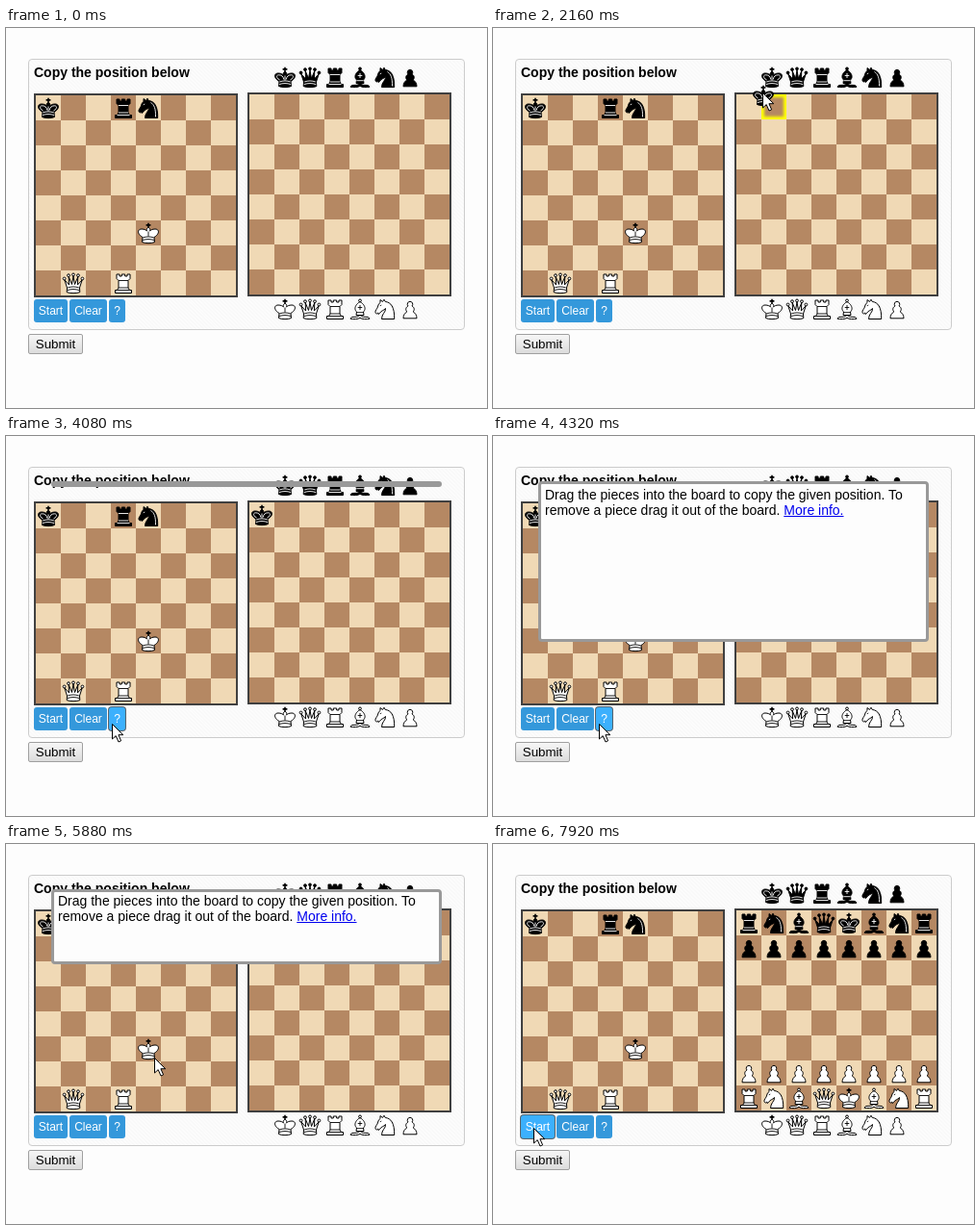
Recreate the animation shown at these times as an HTML page. Size 500x395 px, loop 8000 ms.

```html
<!DOCTYPE html>
<html lang="en">
<head>
<meta charset="utf-8">
<title>Copy the position</title>
<style>
html, body { margin: 0; width: 100%; height: 100%; overflow: hidden; background: #fdfdfd; }
body { position: relative; font: 14px/16px "Liberation Sans", Arial, sans-serif; color: #000; }
body > * { position: absolute; box-sizing: border-box; }
svg { left: 0; top: 0; width: 500px; height: 395px; }
#panel {
  left: 23px; top: 32px; width: 454px; height: 282px;
  border: 1px solid #ccc; border-radius: 4px;
  background: repeating-linear-gradient(45deg, #fcfcfc 0 1.4px, #f9f9f9 1.4px 2.8px);
}
#title { left: 29px; top: 38px; font-weight: bold; white-space: nowrap; }
.btn {
  top: 282px; height: 24px; border-radius: 3px; background: #3498db;
  color: #fff; font-size: 12px; line-height: 24px; text-align: center;
}
.btn.hover { background: #3cb0fd; }
.btn.focus { box-shadow: 0 0 0 1px #56626b; }
#submit {
  left: 23px; top: 318px; width: 57px; height: 21px;
  border: 1px solid #a0a0a0; border-radius: 2px;
  background: linear-gradient(#f6f6f6, #dcdcdc);
  font-size: 13.333px; line-height: 19px; text-align: center;
}
#info {
  left: 47px; top: 47px; width: 406px; overflow: hidden;
  border: 3px solid #999; border-radius: 4px; background: #fdfdfd;
}
#info p { margin: 0 4px; width: 392px; }
#info a { color: #00e; text-decoration: underline; }
.w { --fill: #fff; --line: #000; --inner: none; }
.b { --fill: #000; --line: #fff; --inner: #fff; }
.body { fill: var(--fill); stroke: #000; stroke-linejoin: round; }
.bar { fill: none; stroke: #000; stroke-width: 1.6; }
.line { fill: none; stroke: var(--line); stroke-width: .9; }
.inner { fill: none; stroke: var(--inner); stroke-width: .9; }
.mark { box-shadow: inset 0 0 3px 3px yellow; top: 69px; width: 26px; height: 26px; }
</style>
</head>
<body>
<div id="panel"></div>
<div id="title">Copy the position below</div>
<div class="btn" style="left:29px;width:35px">Start</div>
<div class="btn" style="left:66px;width:39px">Clear</div>
<div class="btn" style="left:107px;width:17px">?</div>
<div id="submit">Submit</div>
<svg id="boards"><defs id="defs"></defs></svg>
<div class="mark" id="mark"></div>
<svg id="moving"></svg>
<div id="info"><p>Drag the pieces into the board to copy the given position. To remove a piece drag it out of the board. <a>More info.</a></p></div>
<svg><path id="cursor" d="M.5 .5V16L4.2 12.6L7 19L9.6 17.8L6.9 11.7H11.8Z" fill="#fff" stroke="#000"/></svg>

<script>
const LOOP = 8000, STEP = 120, CELL = 26;
const LEFT = [31, 70], RIGHT = [253, 69];
const SPARE_X = 277, SPARE_Y = { b: 38, w: 279 };
const KINDS = 'kqrbnp', BACK = 'rnbqkbnr';
const $ = id => document.getElementById(id);

function add(parent, tag, attrs) {
  const el = document.createElementNS('http://www.w3.org/2000/svg', tag);
  for (const key in attrs) el.setAttribute(key, attrs[key]);
  return parent.appendChild(el);
}

// Piece outlines in a 26 x 26 box
const ball = (x, y) => `M${x - 1.4} ${y}a1.4 1.4 0 1 0 2.8 0a1.4 1.4 0 1 0 -2.8 0Z`;
const bands = 'M7.2 18C11 16.6 15 16.6 18.8 18M6.8 20.6C11 19.2 15 19.2 19.2 20.6';
const SHAPES = {
  k: {
    bar: 'M13 2.8V8M10.6 4.9H15.4',
    body: 'M7 17.5C1 14 1.5 9 6 9C9 9 10.5 10 11.3 11C10.8 9 11.8 7.5 13 7.5C14.2 7.5 15.2 9 14.7 11C15.5 10 17 9 20 9C24.5 9 25 14 19 17.5L19.5 22.5C17 24 9 24 6.5 22.5Z',
    line: bands + 'M13 11.5V16.5',
    inner: 'M7.6 16C3.6 14 3.8 10.8 6.5 10.8C9.5 10.8 11.4 12.5 11.8 15.5M18.4 16C22.4 14 22.2 10.8 19.5 10.8C16.5 10.8 14.6 12.5 14.2 15.5'
  },
  q: {
    body: 'M6.5 18L3.8 9.8L8.6 15L8.2 6.6L11.5 14.5L13 6L14.5 14.5L17.8 6.6L17.4 15L22.2 9.8L19.5 18L19.8 22.6C17 24 9 24 6.2 22.6Z'
      + ball(3.6, 8.5) + ball(8, 5.2) + ball(13, 4.4) + ball(18, 5.2) + ball(22.4, 8.5),
    line: bands
  },
  r: {
    body: 'M4.5 23.5V20.5H6.5L8 18V10.5L6 8.5V4H9V6H11.3V4H14.7V6H17V4H20V8.5L18 10.5V18L19.5 20.5H21.5V23.5Z',
    line: 'M8 10.5H18M8 18H18M6.5 20.5H19.5'
  },
  b: {
    body: 'M13 5.5C9 8 7.5 11 8 13.5C8.3 15 9.5 16 9.5 16L9 19.5H17L16.5 16C16.5 16 17.7 15 18 13.5C18.5 11 17 8 13 5.5Z'
      + 'M12 19.8C11 22 8 21 4.5 21.5L3 23.2C6 23.8 11 24 13 22.2C15 24 20 23.8 23 23.2L21.5 21.5C18 21 15 22 14 19.8Z' + ball(13, 4.4),
    line: 'M13 9V14M10.7 11.5H15.3M9.3 16.7H16.7'
  },
  n: {
    body: 'M9.5 23.5C9.5 18 14 16.5 13.5 12.5C11.5 15 9 14.5 7.5 17.5L6 18.5L5.8 17L4.5 18C2.5 17.5 2.5 15.5 4 13.5C5.5 11.5 5.5 10.5 6 9C6.5 7.5 8 6.5 8 6.5V3.5L10.5 5.5L12 3.2L13.3 5.5C19 6 23 11 22.7 23.5Z',
    line: 'M7.8 9.8L9.2 9',
    inner: 'M15.5 7.5C19 9.5 20.8 14 20.5 22.5'
  },
  p: {
    body: 'M13 5.3A2.8 2.8 0 0 0 11 10C8.5 11.3 8 14 9.8 16C7.5 17.3 6 19.5 6 22.8H20C20 19.5 18.5 17.3 16.2 16C18 14 17.5 11.3 15 10A2.8 2.8 0 0 0 13 5.3Z'
  }
};
for (const kind in SHAPES) {
  const g = add($('defs'), 'g', { id: kind });
  for (const part in SHAPES[kind]) add(g, 'path', { class: part, d: SHAPES[kind][part] });
}

const put = (el, x, y) => el.setAttribute('transform', `translate(${x} ${y})`);
function piece(parent, color, kind, x, y) {
  const el = add(parent, 'use', { href: '#' + kind, class: color });
  put(el, x, y);
  return el;
}
const square = ([x, y], col, row) => [x + col * CELL, y + row * CELL];

function board(origin) {
  const [x, y] = origin, size = 8 * CELL;
  add($('boards'), 'rect', { x: x - 2, y: y - 2, width: size + 4, height: size + 4, fill: '#404040' });
  add($('boards'), 'rect', { x, y, width: size, height: size, fill: '#f0d9b5' });
  let d = '';
  for (let row = 0; row < 8; row++)
    for (let col = 1 - row % 2; col < 8; col += 2)
      d += `M${square(origin, col, row)}h${CELL}v${CELL}h-${CELL}Z`;
  add($('boards'), 'path', { d, fill: '#b58863' });
}
board(LEFT);
board(RIGHT);

const given = [['b', 'k', 0, 0], ['b', 'r', 3, 0], ['b', 'n', 4, 0], ['w', 'k', 4, 5], ['w', 'q', 1, 7], ['w', 'r', 3, 7]];
for (const [color, kind, col, row] of given) piece($('boards'), color, kind, ...square(LEFT, col, row));

const spare = (color, kind) => [SPARE_X + KINDS.indexOf(kind) * CELL, SPARE_Y[color]];
for (const color of 'bw')
  for (const kind of KINDS) piece($('boards'), color, kind, ...spare(color, kind));

// Pieces that fly from the spare rows to the opening position
const army = [];
for (const [color, row, kinds] of [['b', 0, BACK], ['b', 1, 'pppppppp'], ['w', 6, 'pppppppp'], ['w', 7, BACK]])
  [...kinds].forEach((kind, col) => {
    const from = spare(color, kind);
    army.push({ from, to: square(RIGHT, col, row), el: piece($('moving'), color, kind, ...from) });
  });
const king = piece($('moving'), 'b', 'k', 0, 0);

// Pointer: time, x, y
const PATH = [
  [1080, 395, 165], [1200, 381, 149], [1320, 358, 125], [1440, 331, 99], [1560, 308, 75], [1680, 294, 60],
  [1800, 288, 53], [1920, 285, 61], [2040, 282, 65], [2160, 280, 67], [2520, 280, 67],
  [2640, 278, 69], [2880, 271, 75], [3000, 269, 76], [3120, 269, 76],
  [3240, 256, 95], [3360, 220, 150], [3600, 124, 282], [3720, 102, 305], [3840, 110, 299], [5280, 110, 299],
  [5400, 150, 229], [5520, 154, 222], [6120, 154, 222],
  [6240, 144, 234], [6480, 102, 280], [6600, 89, 293], [6720, 87, 291], [6840, 87, 292], [6960, 87, 292],
  [7080, 79, 294], [7320, 50, 295], [7440, 42, 295], [LOOP, 42, 295]
];
function pointer(t) {
  const i = Math.max(1, PATH.findIndex(p => p[0] >= t));
  const [t0, x0, y0] = PATH[i - 1], [t1, x1, y1] = PATH[i];
  const k = Math.max(0, (t - t0) / (t1 - t0));
  return [x0 + (x1 - x0) * k, y0 + (y1 - y0) * k];
}

const swing = (t, start, length) => {
  const p = Math.min(1, Math.max(0, (t - start) / length));
  return .5 - Math.cos(p * Math.PI) / 2;
};
const within = (t, a, b) => t >= a && t < b;
const show = (el, on) => { el.style.display = on ? '' : 'none'; };

const buttons = [...document.querySelectorAll('.btn')].map((el, i) => ({
  el, x: [29, 66, 107][i], end: [64, 105, 124][i],
  focus: [[7560, LOOP], [6840, 7560], [4080, 5640]][i]
}));

function draw(t) {
  const [x, y] = pointer(t);
  show($('cursor'), t >= 1080);
  put($('cursor'), x, y);

  for (const { el, x: left, end, focus } of buttons) {
    el.classList.toggle('hover', within(x, left, end) && within(y, 282, 306));
    el.classList.toggle('focus', within(t, ...focus));
  }

  const dragging = within(t, 1920, 3000);
  show(king, within(t, 1920, 7080));
  put(king, ...(dragging ? [x - 12, y - 10] : RIGHT));
  king.setAttribute('opacity', 1 - swing(t, 6860, 200));
  show($('mark'), dragging && y >= RIGHT[1] - 2);
  $('mark').style.left = RIGHT[0] + (x < 279 ? 0 : CELL) + 'px';

  const open = swing(t, 4080, 400) - swing(t, 5625, 400);
  show($('info'), within(t, 4080, 6120));
  $('info').style.height = 6 + 246 * open + 'px';
  $('info').style.paddingTop = 4 * open + 'px';

  const fly = swing(t, 7667, 200);
  for (const { el, from, to } of army) {
    show(el, fly > 0);
    put(el, ...from.map((v, i) => v + (to[i] - v) * fly));
  }
}

const begin = performance.now();
function tick() {
  const t = (performance.now() - begin) % LOOP;
  draw(Math.floor(t / STEP) * STEP);
  requestAnimationFrame(tick);
}
tick();
</script>
</body>
</html>
```
